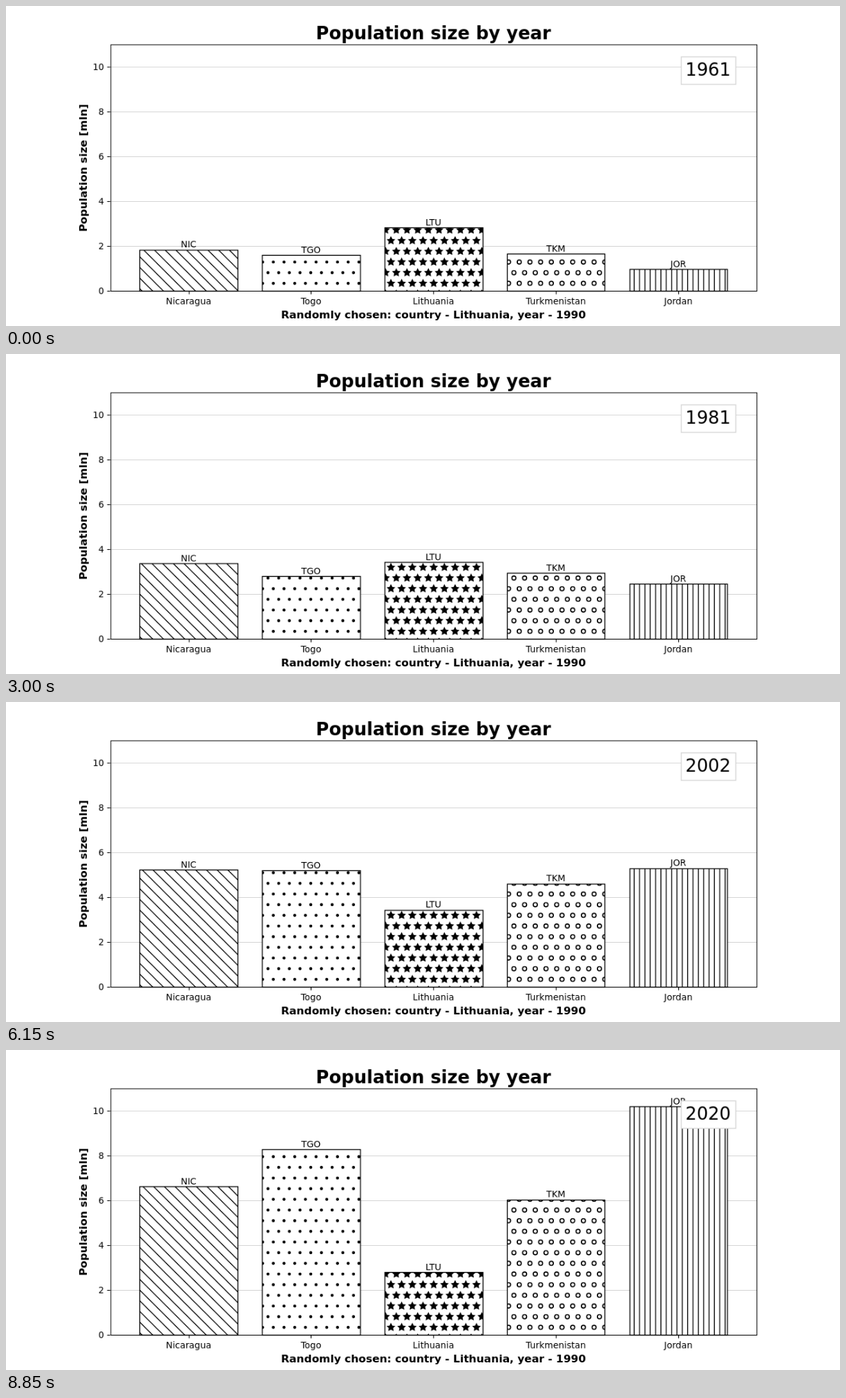
An HTML page with a canvas for the animation above (9000 ms loop, 1207 by 464 pixels).

```html
<!DOCTYPE html>
<html lang="en">
<head>
<meta charset="utf-8">
<title>Population size by year</title>
<style>
  html, body { margin: 0; height: 100%; overflow: hidden; background: #fff; }
  canvas { display: block; width: 100vw; height: 100vh; }
</style>
</head>
<body>
<canvas id="chart" width="1300" height="500"></canvas>
<script>
const ctx = document.getElementById('chart').getContext('2d');
const FIRST_YEAR = 1961, YEARS = 60, STEP = 150;
const LEFT = 162.5, RIGHT = 1170, TOP = 60, BOTTOM = 445, UNIT = 35;
const SLOT = (RIGHT - LEFT) / 5.28, MIDDLE = (LEFT + RIGHT) / 2;
const THIN = 1.11, THICK = 1.39, TILE = 100, CELL = TILE / 6;

// Population in millions at a few key years, joined by a smooth curve
const keyYears = [1961, 1969, 1981, 1989, 1996, 2002, 2008, 2014, 2020];
const countries = [
  { name: 'Nicaragua', code: 'NIC', hatch: diagonals,
    size: [1.83, 2.34, 3.36, 4.08, 4.74, 5.22, 5.66, 6.14, 6.62] },
  { name: 'Togo', code: 'TGO', hatch: grid(dot),
    size: [1.59, 2.03, 2.79, 3.68, 4.34, 5.19, 6.07, 7.14, 8.28] },
  { name: 'Lithuania', code: 'LTU', hatch: grid(star),
    size: [2.82, 3.11, 3.42, 3.68, 3.59, 3.44, 3.20, 2.93, 2.795] },
  { name: 'Turkmenistan', code: 'TKM', hatch: grid(ring),
    size: [1.655, 2.13, 2.94, 3.585, 4.28, 4.61, 4.94, 5.47, 6.03] },
  { name: 'Jordan', code: 'JOR', hatch: verticals,
    size: [0.97, 1.62, 2.45, 3.40, 4.73, 5.29, 6.54, 8.92, 10.2] },
];
for (const country of countries) country.pattern = makePattern(country.hatch);

function makePattern(addPaths) {
  const tile = document.createElement('canvas');
  tile.width = tile.height = TILE;
  const g = tile.getContext('2d');
  g.lineWidth = THICK;
  addPaths(g);
  g.fill('evenodd');
  g.stroke();
  return ctx.createPattern(tile, 'repeat');
}

function diagonals(g) {
  for (let i = -7; i <= 7; i++) {
    g.moveTo(i * CELL - 10, -10);
    g.lineTo(i * CELL + TILE + 10, TILE + 10);
  }
}

function verticals(g) {
  for (let x = CELL / 4; x < TILE; x += CELL / 2) {
    g.moveTo(x, 0);
    g.lineTo(x, TILE);
  }
}

// Staggered rows of one shape
function grid(shape) {
  return g => {
    for (let row = 0; row <= 6; row++)
      for (let col = 0; col <= 6; col++)
        shape(g, (col + row % 2 / 2) * CELL, row * CELL);
  };
}

function circle(g, x, y, r) {
  g.moveTo(x + r, y);
  g.arc(x, y, r, 0, 2 * Math.PI);
}

function dot(g, x, y) {
  circle(g, x, y, CELL * 0.1);
}

function ring(g, x, y) {
  circle(g, x, y, CELL * 0.2);
  circle(g, x, y, CELL * 0.18);
}

function star(g, x, y) {
  for (let i = 0; i < 10; i++) {
    const r = CELL / (i % 2 ? 6 : 3), a = i * Math.PI / 5;
    g[i ? 'lineTo' : 'moveTo'](x + r * Math.sin(a), y - r * Math.cos(a));
  }
  g.closePath();
}

// Centre of the nearest pixel row or column
const snap = v => Math.floor(v + 0.5) + 0.5;

function line(x1, y1, x2, y2, color = '#000') {
  ctx.strokeStyle = color;
  ctx.lineWidth = THIN;
  ctx.beginPath();
  ctx.moveTo(x1, y1);
  ctx.lineTo(x2, y2);
  ctx.stroke();
}

function text(str, x, y, points, align = 'center', weight = 'normal') {
  ctx.font = `${weight} ${points / 0.72}px "DejaVu Sans", sans-serif`;
  ctx.textAlign = align;
  ctx.fillStyle = '#000';
  ctx.fillText(str, x, y);
}

// Cubic Hermite curve through the key years
function sizeAt({ size }, year) {
  const last = keyYears.length - 1;
  const slope = k => {
    const a = Math.max(0, k - 1), b = Math.min(last, k + 1);
    return (size[b] - size[a]) / (keyYears[b] - keyYears[a]);
  };
  const j = Math.max(1, keyYears.findIndex(k => k >= year)), i = j - 1;
  const span = keyYears[j] - keyYears[i], u = (year - keyYears[i]) / span, v = 1 - u;
  return size[i] * v * v * (1 + 2 * u) + size[j] * u * u * (1 + 2 * v)
    + span * u * v * (slope(i) * v - slope(j) * u);
}

function drawBar(country, index, year) {
  const center = LEFT + (index + 0.64) * SLOT;
  const y = BOTTOM - UNIT * sizeAt(country, year);
  const left = snap(center - 0.4 * SLOT), right = snap(center + 0.4 * SLOT);
  const box = [left, snap(y), right - left, snap(BOTTOM) - snap(y)];
  for (const fill of ['#fff', country.pattern]) {
    ctx.fillStyle = fill;
    ctx.fillRect(...box);
  }
  ctx.strokeStyle = '#000';
  ctx.lineWidth = THICK;
  ctx.strokeRect(...box);
  line(snap(center), BOTTOM, snap(center), BOTTOM + 5.4);
  text(country.name, center, 466, 10);
  text(country.code, center, Math.round(y - 3.5), 10);
}

function drawYear(year) {
  const box = [1052.5, 79.5, 85, 43];
  ctx.fillStyle = '#fff';
  ctx.strokeStyle = '#d3d3d3';
  ctx.lineWidth = THICK;
  ctx.fillRect(...box);
  ctx.strokeRect(...box);
  text(year, 1059, 109, 20, 'left');
}

function draw(year) {
  ctx.fillStyle = '#fff';
  ctx.fillRect(0, 0, 1300, 500);
  for (let v = 0; v <= 10; v += 2) {
    const y = BOTTOM - v * UNIT;
    line(LEFT, snap(y), RIGHT, snap(y), '#d3d3d3');
    line(LEFT - 4.86, snap(y), LEFT, snap(y));
    text(v, 152.8, y + 5, 10, 'right');
  }
  countries.forEach((country, i) => drawBar(country, i, year));

  ctx.strokeStyle = '#000';
  ctx.lineWidth = THIN;
  ctx.strokeRect(snap(LEFT), snap(TOP), snap(RIGHT) - snap(LEFT), BOTTOM - TOP);

  text('Population size by year', MIDDLE, 52, 20, 'center', 'bold');
  text('Randomly chosen: country - Lithuania, year - 1990', MIDDLE, 488, 12, 'center', 'bold');
  ctx.save();
  ctx.translate(126, (TOP + BOTTOM) / 2 + 0.5);
  ctx.rotate(-Math.PI / 2);
  text('Population size [mln]', 0, 0, 12, 'center', 'bold');
  ctx.restore();
  drawYear(year);
}

function tick() {
  draw(FIRST_YEAR + Math.floor(performance.now() / STEP) % YEARS);
  requestAnimationFrame(tick);
}
tick();
</script>
</body>
</html>
```
